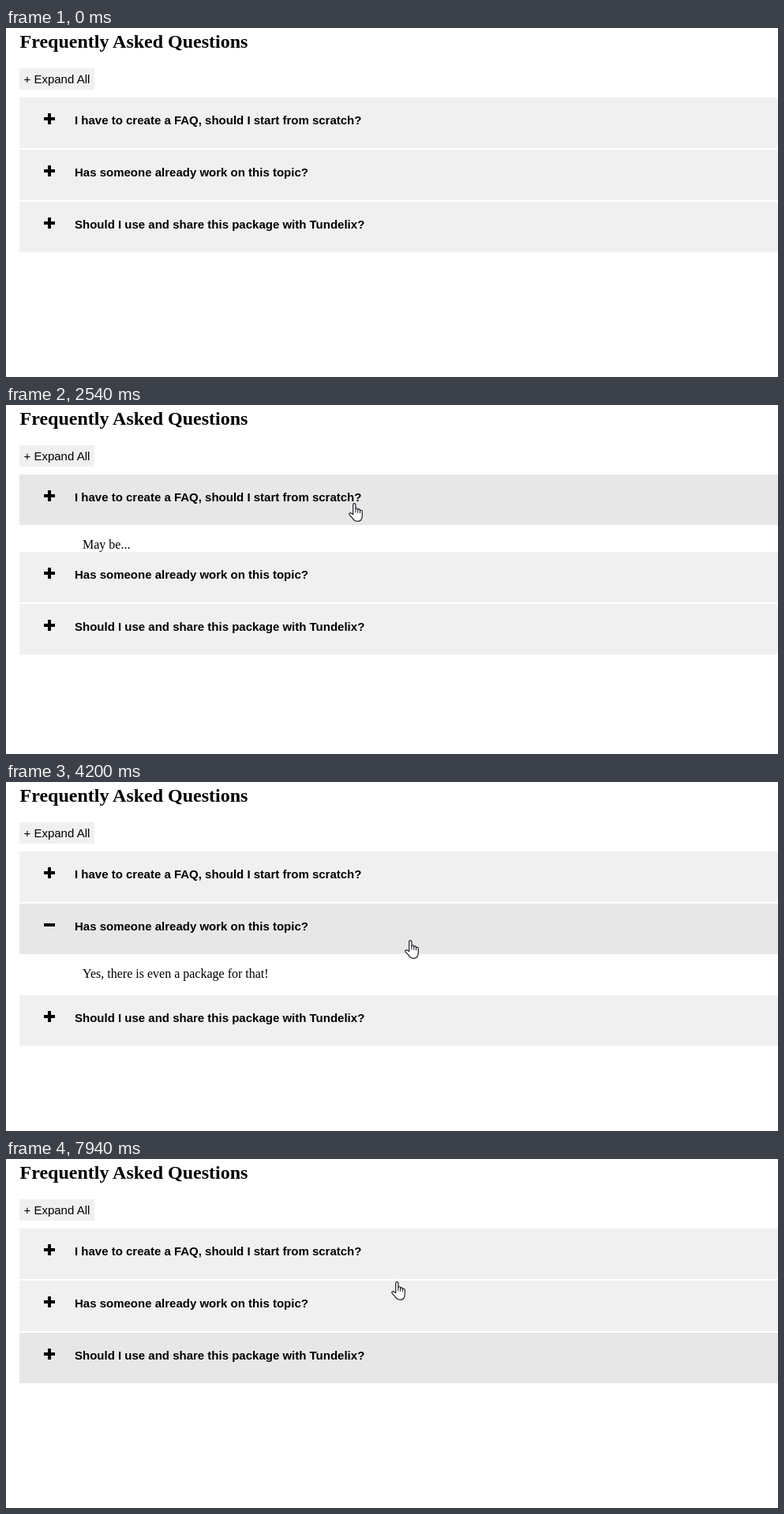
An HTML page that plays this animation: 978 px wide and 442 px high, repeating every 8000 ms.

```html
<!DOCTYPE html>
<html lang="en">
<head>
<meta charset="utf-8">
<title>FAQ accordion</title>
<style>
html, body { margin: 0; width: 100%; height: 100%; overflow: hidden; background: #fff; }
#stage { display: block; width: 978px; height: 442px; }
.title { font: bold 24px "Liberation Serif", "Times New Roman", serif; }
.button { font: 15px "Liberation Sans", Arial, sans-serif; }
.question { font: bold 15px "Liberation Sans", Arial, sans-serif; }
.answer { font: 16px "Liberation Serif", "Times New Roman", serif; }
</style>
</head>
<body>
<svg id="stage" viewBox="0 0 978 442">
  <text class="title" x="17.5" y="25">Frequently Asked Questions</text>
  <rect x="17" y="51" width="95" height="27" fill="#f0f0f0"/>
  <text class="button" x="22.5" y="70">+ Expand All</text>
  <g id="list"></g>
  <g id="cursor" stroke="#1c1c24" stroke-linecap="round" stroke-linejoin="round">
    <path fill="#fff" stroke-width="1.2" d="M5.7 14.5V2.3a1.6 1.6 0 0 1 3.2 0V8a1.4 1.4 0 0 1 2.8 .3V9.2a1.4 1.4 0 0 1 2.8 .3V10.5a1.4 1.4 0 0 1 2.8 .3V16c0 4-2 7.3-6 7.3c-3.5 0-5-1.5-6.3-4L1 14.8c-.8-1.6 1.2-2.8 2.4-1.5z"/>
    <path fill="none" d="M8.9 8v4M11.7 9v3.5M14.5 10v3"/>
  </g>
</svg>
<script>
const LOOP = 8000, SLIDE = 400, HOVER_LAG = 120;
const LIST_TOP = 88, ROW_HEIGHT = 64, GAP = 2, PANEL = 52;

const items = [
  { question: 'I have to create a FAQ, should I start from scratch?', answer: 'May be...',
    open: 940, close: 2375 },
  { question: 'Has someone already work on this topic?', answer: 'Yes, there is even a package for that!',
    open: 3390, close: 4775 },
  { question: 'Should I use and share this package with Tundelix?', answer: 'For sure!',
    open: 6230, close: 7445 }
];

const entry = { start: 70, x: 871, y: 419 };
const moves = [
  { start: 70, end: 760, x: 434, y: 139 },
  { start: 1900, end: 2040, x: 434, y: 124 },
  { start: 2650, end: 3080, x: 374, y: 177 },
  { start: 3800, end: 4200, x: 505, y: 200 },
  { start: 4330, end: 4520, x: 505, y: 188 },
  { start: 4980, end: 5420, x: 519, y: 241 },
  { start: 6320, end: 6450, x: 519, y: 253 },
  { start: 7800, end: 7940, x: 488, y: 155 }
];

const list = document.getElementById('list');
const cursor = document.getElementById('cursor');

function add(parent, tag, attributes, text = '') {
  const node = document.createElementNS('http://www.w3.org/2000/svg', tag);
  for (const name in attributes) node.setAttribute(name, attributes[name]);
  node.textContent = text;
  return parent.appendChild(node);
}

for (const item of items) {
  item.group = add(list, 'g', {});
  item.bar = add(item.group, 'rect', { x: 17, width: 961, height: ROW_HEIGHT });
  add(item.group, 'rect', { x: 48, y: 25, width: 14, height: 4 });
  item.stem = add(item.group, 'rect', { x: 53, y: 20, width: 4, height: 14 });
  add(item.group, 'text', { class: 'question', x: 87, y: 34 }, item.question);
  item.panel = add(item.group, 'svg', { y: ROW_HEIGHT, width: 978, height: 0, overflow: 'hidden' });
  add(item.panel, 'text', { class: 'answer', x: 97, y: 30 }, item.answer);
}

const clamp = value => Math.min(1, Math.max(0, value));
const swing = p => .5 - Math.cos(Math.PI * clamp(p)) / 2;

function pointerAt(t) {
  let { x, y } = entry;
  for (const move of moves) {
    const p = clamp((t - move.start) / (move.end - move.start));
    x += (move.x - x) * p;
    y += (move.y - y) * p;
  }
  return { x: Math.round(x), y: Math.round(y) };
}

function draw(t) {
  const pointer = pointerAt(t);
  const hoverY = pointerAt(t - HOVER_LAG).y;
  let y = LIST_TOP;
  for (const item of items) {
    const shown = swing((t - item.open) / SLIDE) - swing((t - item.close) / SLIDE);
    const height = Math.round(GAP + (PANEL - GAP) * shown);
    const hovered = hoverY >= y && hoverY < y + ROW_HEIGHT;
    const expanded = t >= item.open && t < item.close;
    item.group.setAttribute('transform', `translate(0 ${y})`);
    item.bar.setAttribute('fill', hovered ? '#e7e7e7' : '#f0f0f0');
    item.stem.setAttribute('visibility', expanded ? 'hidden' : 'visible');
    item.panel.setAttribute('height', height);
    y += ROW_HEIGHT + height;
  }
  cursor.setAttribute('visibility', t < entry.start ? 'hidden' : 'visible');
  cursor.setAttribute('transform', `translate(${pointer.x} ${pointer.y})`);
}

const start = performance.now();
function tick() {
  draw((performance.now() - start) % LOOP);
  requestAnimationFrame(tick);
}
tick();
</script>
</body>
</html>
```
